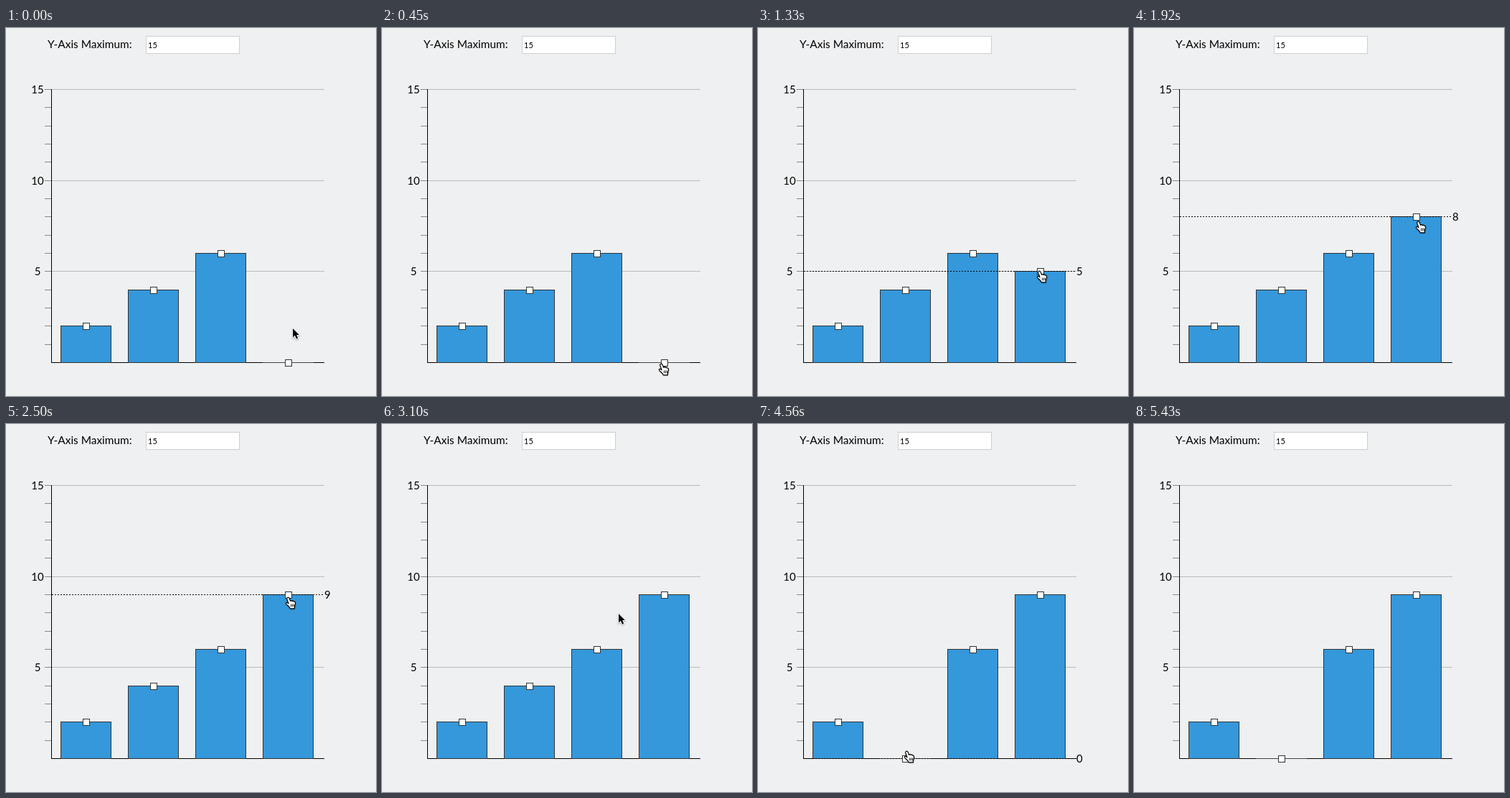
Write an HTML page with a canvas that moves like this. It is 516 px wide and 512 px high and loops after 6180 ms.

```html
<!DOCTYPE html>
<html lang="en">
<head>
<meta charset="utf-8">
<title>Adjustable bar chart</title>
<style>
  html, body { margin: 0; width: 516px; height: 512px; overflow: hidden; background: #eff0f2; }
  canvas, svg { position: absolute; left: 0; top: 0; display: block; }
  text { font: 15px Lato, "Open Sans", sans-serif; fill: #000; }
  .tick { text-anchor: middle; }
</style>
</head>
<body>
<canvas id="chart" width="516" height="512"></canvas>
<svg width="516" height="512">
  <text x="58" y="28" style="font-size:15.4px">Y-Axis Maximum:</text>
  <text x="198" y="28" style="font-size:11px">15</text>
  <text class="tick" x="44" y="91">15</text>
  <text class="tick" x="44" y="218">10</text>
  <text class="tick" x="44" y="344">5</text>
  <text id="reading" x="444"></text>
</svg>
<script>
const ctx = document.getElementById('chart').getContext('2d');
const reading = document.getElementById('reading');

const LOOP = 6180, MAX = 15, BASE = 465, UNIT = 380 / MAX;
const LEFT = 63, RIGHT = 444, BAR = 71, PITCH = 94, FIRST = 76;
const START = [2, 4, 6, 0];

// Pointer gestures: start time, step length, cursor, dragged bar, positions
const gestures = [
  [0, 150, 'arrow', -1, [[400, 418], [399, 434], [394, 452]]],
  [450, 0, 'hand', -1, [[385, 466]]],
  [740, 146.67, 'hand', 3, [[388, 438], [390, 413], [389, 388], [388, 363], [388, 337], [389, 314],
    [390, 293], [391, 278], [392, 268], [392, 257], [391, 248], [390, 243], [389, 240]]],
  [3100, 144.3, 'arrow', -1, [[330, 264], [272, 284], [229, 319], [209, 348]]],
  [3677, 0, 'hand', -1, [[202, 364]]],
  [3822, 144.3, 'hand', 1, [[203, 374], [204, 385], [204, 421]]],
  [4260, 150, 'hand', 1, [[204, 431], [203, 444], [203, 454], [202, 461]]],
  [5000, 143.3, 'arrow', -1, [[182, 478], [130, 490], [77, 502]]],
  [5430, 0, 'none', -1, [[0, 0]]]
];
const steps = gestures.flatMap(([start, gap, cursor, bar, path]) =>
  path.map(([x, y], i) => ({ time: start + gap * i, cursor, bar, x, y })));

const arrow = new Path2D('M0 0V12.4L2.9 9.7L5 14.4L7.2 13.4L5.2 8.9H9Z');
const hand = new Path2D('M3.4 1.6C4.4 .8 5.6 1.2 6.1 2.4L7.7 6.4C8.4 5.4 9.8 5.5 10.3 6.6' +
  'C11.1 5.8 12.2 6 12.7 7.2C13.8 6.7 14.5 7.5 14.6 8.8C14.8 11.2 14.2 12.3 13.5 14.2V16.8H7.4' +
  'C6.7 14.4 4.3 13 2.1 10.8C.6 9.2 1.8 7.8 3.4 8.6L5 9.8L2.9 3.9C2.5 2.9 2.7 2.1 3.4 1.6Z');

const rowOf = value => Math.round(BASE - value * UNIT);

function rect(color, x, y, w, h) {
  ctx.fillStyle = color;
  ctx.fillRect(x, y, w, h);
}

function box(fill, edge, x, y, w, h) {
  rect(edge, x, y, w, h);
  if (h > 2) rect(fill, x + 1, y + 1, w - 2, h - 2);
}

function drawAxes() {
  box('#fff', '#ccced0', 195, 11, 131, 25);
  for (let v = 1; v <= MAX; v++) {
    const y = rowOf(v);
    rect('#888', 54, y, 9, 1);
    if (v % 5 === 0) rect('#b9babc', LEFT, y, RIGHT - LEFT, 1);
  }
  rect('#000', LEFT, 85, 1, 381);
  rect('#000', LEFT, BASE, RIGHT - LEFT, 1);
}

function drawCursor({ cursor, x, y }) {
  if (cursor === 'none') return;
  ctx.save();
  ctx.translate(x, y);
  ctx.lineJoin = 'round';
  ctx.shadowColor = 'rgba(0,0,0,.35)';
  ctx.shadowBlur = 2;
  ctx.shadowOffsetY = 1;
  if (cursor === 'arrow') {
    ctx.strokeStyle = '#fff';
    ctx.lineWidth = 2;
    ctx.stroke(arrow);
    ctx.shadowColor = 'transparent';
    ctx.fillStyle = '#000';
    ctx.fill(arrow);
  } else {
    ctx.fillStyle = '#fff';
    ctx.fill(hand);
    ctx.shadowColor = 'transparent';
    ctx.strokeStyle = '#000';
    ctx.lineWidth = 1.2;
    ctx.stroke(hand);
    for (const fold of [8.2, 10.2, 12.2]) rect('#000', fold, 10.5, 0.9, 3.8);
  }
  ctx.restore();
}

function draw(time) {
  const values = START.slice();
  let now = steps[0];
  for (const step of steps) {
    if (step.time > time) break;
    now = step;
    if (step.bar >= 0) values[step.bar] = Math.max(0, Math.round((BASE - 1 - step.y) / UNIT));
  }

  rect('#eff0f2', 0, 0, 516, 512);
  drawAxes();
  values.forEach((v, i) => {
    const y = rowOf(v);
    box('#3498db', v ? '#333' : '#444', FIRST + i * PITCH, y, BAR, BASE - y + 1);
  });
  rect('#000', LEFT, BASE, 13, 1);

  const dragging = now.bar >= 0;
  if (dragging) {
    const y = rowOf(values[now.bar]);
    for (let x = LEFT + 1; x < RIGHT - 1; x += 4) rect('#000', x, y, 2, 1);
    reading.setAttribute('y', y + 6);
  }
  const label = dragging ? String(values[now.bar]) : '';
  if (reading.textContent !== label) reading.textContent = label;

  values.forEach((v, i) => box('#fff', '#333', FIRST + 31 + i * PITCH, rowOf(v) - 4, 10, 10));
  drawCursor(now);
}

const begin = performance.now();
function tick() {
  draw((performance.now() - begin) % LOOP);
  requestAnimationFrame(tick);
}
tick();
</script>
</body>
</html>
```
